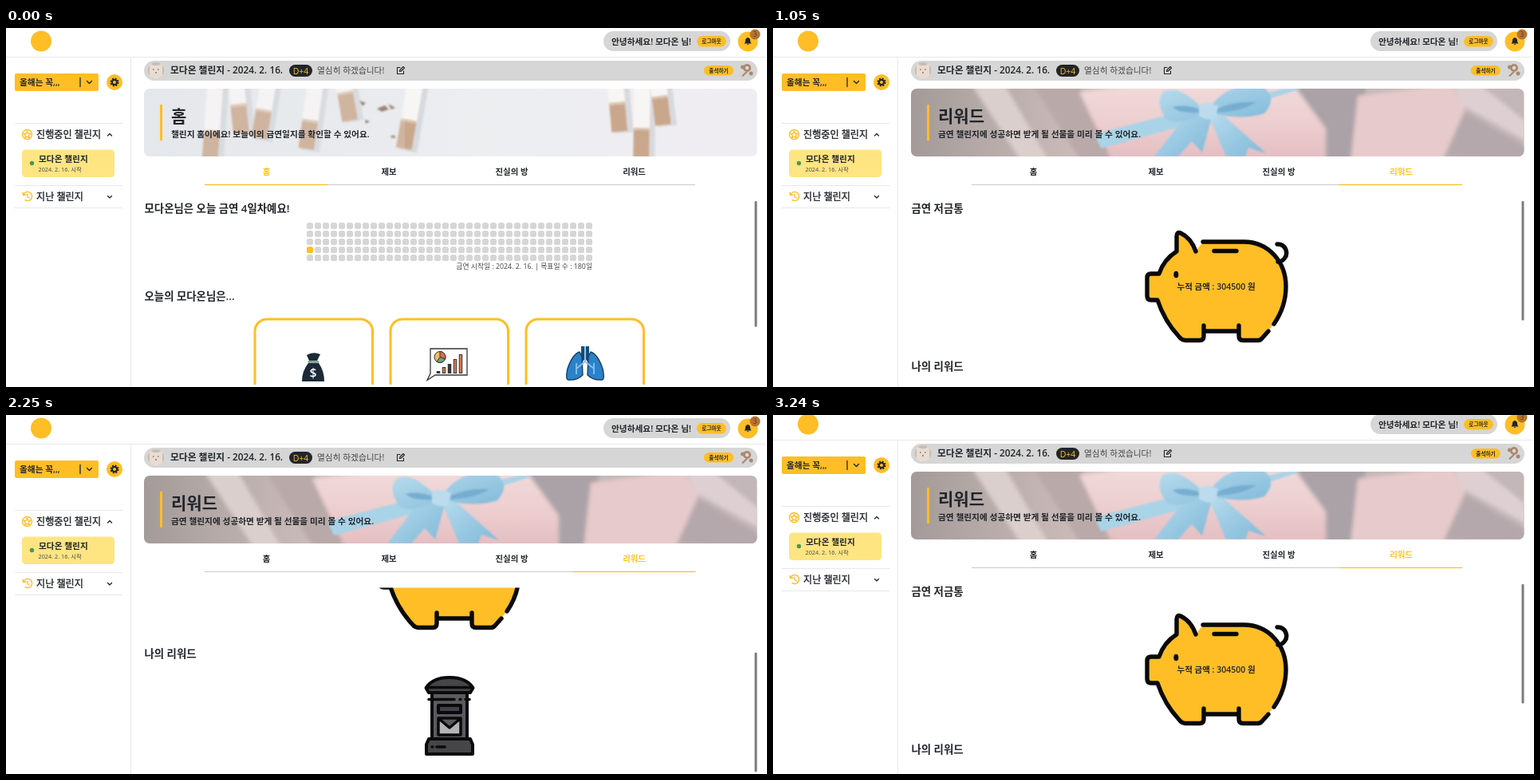
Write an HTML page that moves like this. It is 954 px wide and 450 px high and loops after 4.17 s.

```html
<!DOCTYPE html>
<html lang="ko">
<head>
<meta charset="utf-8">
<title>금연 챌린지</title>
<style>
  html, body { margin: 0; width: 100%; height: 100%; overflow: hidden; background: #fff; }
  svg { display: block; width: 100vw; height: 100vh; }
  text { font: 600 10.7px "Open Sans", "Noto Sans CJK KR", sans-serif; fill: #212529; }
  .light { font-weight: 400; fill: #444; }
  .menu { font-size: 12.1px; font-weight: 400; stroke: #212529; stroke-width: .35px; }
  .tiny { font-size: 6.6px; text-anchor: middle; }
  .title { font-size: 21px; }
  .section { font-size: 13.4px; }
  .tab { font-size: 10.4px; text-anchor: middle; }
  .tab.on { fill: #ffc21f; }
  .y { fill: #ffbe26; }
  .g { fill: #d6d6d6; }
  .line { fill: none; stroke: #212529; stroke-width: 1.3; stroke-linecap: round; stroke-linejoin: round; }
  .rule { stroke: #e8e8e8; }
  .pig { fill: none; stroke: #0a0a0a; stroke-width: 5.4; stroke-linecap: round; stroke-linejoin: round; }
  .box { stroke: #0a0a0a; stroke-width: 4; stroke-linejoin: round; }
</style>
</head>
<body>
<svg viewBox="0 0 954 450" preserveAspectRatio="none">
  <defs>
    <clipPath id="view"><rect x="170" y="216.5" width="767" height="230.5"/></clipPath>
    <clipPath id="bannerClip"><rect x="173" y="76" width="768.5" height="85" rx="7"/></clipPath>
    <clipPath id="avatarClip"><circle cx="188" cy="53" r="10.3"/></clipPath>
    <filter id="soft" x="-5%" y="-30%" width="110%" height="160%"><feGaussianBlur stdDeviation="2.5"/></filter>
    <filter id="slight" x="-5%" y="-30%" width="110%" height="160%"><feGaussianBlur stdDeviation=".9"/></filter>
    <linearGradient id="ash"><stop stop-color="#e3e7ea"/><stop offset=".55" stop-color="#eceef0"/><stop offset="1" stop-color="#f0edf2"/></linearGradient>
    <linearGradient id="taupe"><stop stop-color="#a39b99"/><stop offset=".12" stop-color="#b5aaa8"/><stop offset=".28" stop-color="#cbbcba"/><stop offset="1" stop-color="#c3b6b9"/></linearGradient>
    <linearGradient id="blush" x2="0" y2="1"><stop stop-color="#f1dbdb"/><stop offset=".5" stop-color="#edcfd0"/><stop offset="1" stop-color="#e3bcc0"/></linearGradient>
    <linearGradient id="sky" x2="1" y2="1"><stop stop-color="#b9dced"/><stop offset="1" stop-color="#7fb9d9"/></linearGradient>
    <g id="cigarette">
      <rect x="-6" y="-46" width="23" height="96" fill="#c9ccd0" opacity=".6"/>
      <rect x="-10" y="-48" width="20" height="96" fill="#f8f6f4"/>
      <rect x="-10" y="14" width="20" height="34" fill="#c9a78d"/>
      <rect x="-10" y="11" width="20" height="3" fill="#dcc5b0"/>
    </g>
  </defs>

  <g id="page">
    <!-- header -->
    <path class="rule" d="M0 36.5H952M156.5 37V455"/>
    <circle class="y" cx="44" cy="16.5" r="13"/>
    <rect class="g" x="749" y="4" width="159" height="25" rx="12.5"/>
    <text x="759" y="20.5">안녕하세요! 모다온 님!</text>
    <rect class="y" x="866" y="10" width="37" height="13.5" rx="6.7"/>
    <text class="tiny" x="884.5" y="19.3">로그아웃</text>
    <circle class="y" cx="930" cy="17" r="12.5"/>
    <path d="M925.5 19.5Q927 18 927 15.5Q927 12.5 930 12Q933 12.5 933 15.5Q933 18 934.5 19.5ZM928.5 20.2H931.5Q930 22.5 928.5 20.2" fill="#212529"/>
    <circle cx="939" cy="8" r="6.5" fill="#bb722b"/>
    <text class="light" x="939" y="11" style="font-size:8.5px;text-anchor:middle">3</text>

    <!-- sidebar -->
    <rect class="y" x="11" y="57" width="105" height="22" rx="2"/>
    <text x="17" y="72">올해는 꼭,,,</text>
    <path class="line" d="M93 62.5V73.5M101.5 66.5L104.5 69.5L107.5 66.5"/>
    <circle class="y" cx="136" cy="68" r="10"/>
    <circle cx="136" cy="68" r="4.5" fill="none" stroke="#212529" stroke-width="2" stroke-dasharray="2 1.534"/>
    <circle cx="136" cy="68" r="3" fill="none" stroke="#212529" stroke-width="2"/>
    <path class="rule" d="M11 119.5H146M11 197.5H146M11 225.5H146"/>
    <g fill="none" stroke="#ffbe26" stroke-width="1.4" stroke-linejoin="round" stroke-linecap="round">
      <circle cx="26.5" cy="133.5" r="6"/>
      <path d="M26.5 129.3L27.8 132.2L30.8 132.5L28.6 134.6L29.2 137.6L26.5 136.1L23.8 137.6L24.4 134.6L22.2 132.5L25.2 132.2Z"/>
      <path d="M22 208.5A5.6 5.6 0 1 1 24 215.7M21 206.5L21.8 209.5L25 209M27 208.3V211.5L29.3 213"/>
    </g>
    <text class="menu" x="38" y="138">진행중인 챌린지</text>
    <path class="line" d="M127.5 135L130 132.5L132.5 135M127.5 210.5L130 213L132.5 210.5"/>
    <rect x="20" y="152.5" width="116" height="34.5" rx="4.5" fill="#ffe582"/>
    <circle cx="32.5" cy="169.5" r="2.7" fill="#429c50"/>
    <text x="41" y="168">모다온 챌린지</text>
    <text class="light" x="40.5" y="180" style="font-size:7.3px">2024. 2. 16. 시작</text>
    <text class="menu" x="38" y="215.5">지난 챌린지</text>

    <!-- challenge bar -->
    <rect class="g" x="173" y="41" width="769" height="25" rx="12.5"/>
    <g clip-path="url(#avatarClip)">
      <path d="M177 42H199V64H177Z" fill="#c9bdb4"/>
      <path d="M180 64V44L185 47H191L196 44V64Z" fill="#e9ddd2"/>
      <path d="M184 52h1.500M190 52h1.500M187 56h2" stroke="#8a7168" stroke-width="1.5"/>
    </g>
    <text x="206" y="57" style="font-size:11.8px">모다온 챌린지 - 2024. 2. 16.</text>
    <rect x="355" y="46" width="29" height="15" rx="7.5" fill="#212529"/>
    <text class="light" x="369.5" y="57.5" style="font-size:10.5px;text-anchor:middle;fill:#ffbe26">D+4</text>
    <text class="light" x="390" y="57">열심히 하겠습니다!</text>
    <path class="line" style="stroke-width:1.1" d="M494 49.5H490.5V57.5H498.5V54M493.5 54.5L494 52.5L498 48.5L499.5 50L495.5 54Z"/>
    <rect class="y" x="875" y="47" width="37" height="12.5" rx="6.2"/>
    <text class="tiny" x="893.5" y="55.8">출석하기</text>
    <g fill="#a98873">
      <circle cx="929" cy="50" r="5"/><circle cx="923.5" cy="49" r="2.5"/><circle cx="934" cy="57" r="2.5"/>
      <path d="M928 54L922 60L924 61L930 55Z"/>
      <circle cx="929" cy="50" r="2.2" fill="#ecd8c9"/>
    </g>

    <!-- banner -->
    <g clip-path="url(#bannerClip)">
      <g id="homeBanner">
        <path d="M173 76H942V161H173Z" fill="url(#ash)"/>
        <g filter="url(#slight)">
          <use href="#cigarette" transform="translate(259 117) rotate(4)"/>
          <use href="#cigarette" transform="translate(290 84) rotate(-6)"/>
          <use href="#cigarette" transform="translate(325 91) rotate(9)"/>
          <use href="#cigarette" transform="translate(383 104) rotate(8)"/>
          <use href="#cigarette" transform="translate(423 69) rotate(-10)"/>
          <use href="#cigarette" transform="translate(507 104) rotate(10)"/>
          <use href="#cigarette" transform="translate(765 82) rotate(-5)"/>
          <use href="#cigarette" transform="translate(797 114) rotate(1)"/>
          <use href="#cigarette" transform="translate(818 74) rotate(-7)"/>
          <path d="M443 91l8 3-4 4zM465 101l10-4 5 5-9 3zM479 95l9 5-5 2zM450 115l6 2-5 3zM481 137l5-3 3 4z" fill="#8a6b59"/>
        </g>
        <path d="M173 76H500V161H173Z" fill="#e8ebee" opacity=".2"/>
      </g>
      <g id="rewardBanner">
        <path d="M173 76H942V161H173Z" fill="url(#taupe)"/>
        <g filter="url(#soft)">
          <path d="M248 70H290L345 165H310Z" fill="#dacfcc"/>
          <path d="M325 70H386L424 165H385Z" fill="#b9a9a9"/>
          <path d="M384 80L490 66H648L692 126V168H426Z" fill="url(#blush)"/>
          <path d="M650 66H745L726 168H694V126Z" fill="#aaa2a7"/>
          <path d="M733 85L850 70L868 100L838 168H724Z" fill="#e7cacb"/>
          <path d="M852 70H885L945 118V142L866 98Z" fill="#ded0d2"/>
          <path d="M842 161L868 105L945 150V168Z" fill="#b5a8ac"/>
        </g>
        <g filter="url(#slight)">
          <path d="M403 133L500 108L535 101L642 76H662L535 117L411 151Z" fill="#a9d3e6"/>
          <path d="M533 100L515 113L478 161H508L525 142L538 156L550 112Z" fill="url(#sky)"/>
          <path d="M544 105L568 161H592L596 150L618 157L562 107Z" fill="url(#sky)"/>
          <path d="M538 100Q508 70 489 80Q478 96 495 116Q510 122 540 107ZM549 98Q570 68 613 73Q634 87 616 107Q588 116 553 107Z" fill="url(#sky)"/>
          <path d="M536 102Q514 95 501 99Q510 108 537 106ZM555 102Q580 91 606 93Q588 105 555 106Z" fill="#76add0"/>
          <path d="M534 96Q545 91 558 98L555 113Q544 117 534 110Z" fill="#bcdced"/>
        </g>
      </g>
    </g>
    <path class="y" d="M193 96H196V141H193Z"/>
    <text class="title" id="heading" x="207" y="118"></text>
    <text id="subtitle" x="207" y="136.8"></text>

    <!-- tabs -->
    <path d="M249 196.5H864" stroke="#c9c9c9"/>
    <rect class="y" id="underline" y="195.8" width="154" height="1.3"/>
    <text class="tab" x="326.5" y="184.3">홈</text>
    <text class="tab" x="480" y="184.3">제보</text>
    <text class="tab" x="634" y="184.3">진실의 방</text>
    <text class="tab" x="787.5" y="184.3">리워드</text>

    <g clip-path="url(#view)">
      <g id="home">
        <text class="section" x="173.5" y="231">모다온님은 오늘 금연 4일차예요!</text>
        <g id="days"></g>
        <text class="light" x="735" y="301.5" style="font-size:8.8px;text-anchor:end">금연 시작일 : 2024. 2. 16. | 목표일 수 : 180일</text>
        <text class="section" x="173.5" y="341">오늘의 모다온님은...</text>
        <g fill="#fff" stroke="#ffbe26" stroke-width="3">
          <rect x="312" y="365" width="147.5" height="170" rx="15"/>
          <rect x="482" y="365" width="147.5" height="170" rx="15"/>
          <rect x="652" y="365" width="147.5" height="170" rx="15"/>
        </g>
        <rect id="note" x="388.5" width="6" height="4" fill="#e9b29c"/>
        <g class="icon" data-x="385" data-y="444">
          <path d="M377 410Q385 405 394 409L390 417H380ZM379 420H392Q399 430 399 443H371Q371 430 379 420Z" fill="#1c2936"/>
          <path d="M378.5 418.5H392" stroke="#4f8f77" stroke-width="2"/>
          <text x="385" y="438.5" style="font-size:16px;fill:#fff;text-anchor:middle">$</text>
        </g>
        <g class="icon" data-x="578" data-y="421">
          <path d="M534 402H578V435H538L528 441.5L532 433V402Z" fill="#fff" stroke="#33363b" stroke-width="1.3"/>
          <circle cx="544" cy="412.5" r="7" fill="#f0bd62" stroke="#33363b"/>
          <path d="M544 412.5V405.5A7 7 0 0 1 550.5 415Z" fill="#d96d50" stroke="#33363b"/>
          <path d="M544 412.5L550.5 415A7 7 0 0 1 540 418.3Z" fill="#78a078" stroke="#33363b"/>
          <path d="M542 433V430M549 433V425M556 433V421M563 433V415M570 433V409" stroke="#33363b" stroke-width="4.5"/>
          <path d="M549 432V426M563 432V416M570 432V410" stroke="#d9784b" stroke-width="2.5"/>
        </g>
        <g class="icon" data-x="726" data-y="421">
          <path d="M723 399V415L717 422M729 399V415L735 422" fill="none" stroke="#164b7d" stroke-width="4"/>
          <path d="M719 406Q710 409 704 427Q701 441 705 441Q716 442 723 435L722 412ZM733 406Q742 409 748 427Q751 441 747 441Q736 442 729 435L730 412Z" fill="#2b82c9" stroke="#183f65" stroke-width="1.4"/>
          <path d="M726 399V418L715 427M726 418L737 427M715 420V434M737 420V434" fill="none" stroke="#83c1ed" stroke-width="1.8"/>
        </g>
      </g>

      <g id="reward">
        <text class="section" x="173.5" y="231">금연 저금통</text>
        <path class="y" d="M484 308Q490 290 506 280V261Q506 255 511 257Q524 263 530 280L539 268H590C622 268 643 294 643 324C643 343 637 358 628 371L613 389Q611 391.500 608 391.500H589Q584 391.500 584 386V380H540V386Q540 391.500 535 391.500H517Q513 391.500 510 388Q491 368 482 341H474Q469 341 469 336V313Q469 308 474 308Z"/>
        <path class="pig" d="M530 280Q524 263 511 257Q506 255 506 261V280Q490 290 484 308H474Q469 308 469 313V336Q469 341 474 341H482Q491 368 510 388Q513 391.500 517 391.500H535Q540 391.500 540 386V373M540 380H584M584 373V386Q584 391.500 589 391.500H608Q611 391.500 613 389L621 380M628 371C637 358 643 343 643 324C643 294 622 268 590 268H539M553 279.5H581M632 271C642 270 647 282 641 289Q638 293 633 293"/>
        <ellipse cx="505.3" cy="309" rx="3" ry="4.3" fill="#0a0a0a"/>
        <text x="506.5" y="328" style="font-size:10.5px">누적 금액 : 304500 원</text>
        <text class="section" x="173.5" y="428.5">나의 리워드</text>
        <g transform="translate(0 125)">
          <path class="box" fill="#5b5b5f" d="M534 348H578V408H534Z"/>
          <path class="box" fill="#464649" d="M526.5 342Q535 329 556 329Q577 329 585.5 342L582 348H530Z"/>
          <path class="box" fill="#464649" d="M530 406H582L585 413V425H527V413Z"/>
          <path class="pig" style="stroke-width:3.5" d="M528 341.5H584M530 356.5H562M569 356.5H570M576 356.5H581M534 416H535M540 416H550"/>
          <path class="box" fill="#41414e" d="M542 364H570V373H542Z"/>
          <path class="box" style="stroke-width:3.5" fill="#b4b4b6" d="M542 380H570V401H542ZM543 381L556 392L569 381"/>
        </g>
      </g>
    </g>
    <rect id="thumb" x="938.5" width="3" rx="1" fill="#7c7c7c"/>
    <g id="toast">
      <rect class="g" x="456" y="361" width="200" height="32" rx="4.5"/>
      <text x="556" y="380.5" style="font-size:9.3px;text-anchor:middle">리워드는 챌린지가 끝난 후 확인할 수 있습니다!</text>
    </g>
  </g>
</svg>
<script>
const LOOP = 4170, SWITCH = 780;
const $ = id => document.getElementById(id);
const tabs = document.querySelectorAll('.tab');
const icons = document.querySelectorAll('.icon');

// 180 days, filled column by column; the fourth is today
$('days').innerHTML = Array.from({ length: 180 }, (_, i) =>
  `<rect class="${i === 3 ? 'y' : 'g'}" x="${377 + 10 * Math.floor(i / 5)}" y="${244 + 10 * (i % 5)}" width="8" height="8" rx="2.6"/>`
).join('');

// Eased progress from 0 to 1 between two times
function ramp(t, from, to) {
  const p = Math.min(1, Math.max(0, (t - from) / (to - from)));
  return p < .5 ? 4 * p ** 3 : 1 - (2 - 2 * p) ** 3 / 2;
}
const show = (id, on) => { $(id).style.display = on ? '' : 'none'; };

function draw(t) {
  const home = t < SWITCH;
  show('home', home);
  show('homeBanner', home);
  show('reward', !home);
  show('rewardBanner', !home);
  $('heading').textContent = home ? '홈' : '리워드';
  $('subtitle').textContent = home
    ? '챌린지 홈이에요! 보늘이의 금연일지를 확인할 수 있어요.'
    : '금연 챌린지에 성공하면 받게 될 선물을 미리 볼 수 있어요.';
  tabs.forEach((tab, i) => tab.classList.toggle('on', i === (home ? 0 : 3)));
  $('underline').setAttribute('x', 249 + 461 * ramp(t, SWITCH, 1050));

  const scale = 1 - .025 * (1 - Math.cos(2 * Math.PI * t / 1140));
  for (const icon of icons) {
    const { x, y } = icon.dataset;
    icon.setAttribute('transform', `translate(${x} ${y}) scale(${scale}) translate(${-x} ${-y})`);
  }
  show('note', t > 450 && t < 700);
  $('note').setAttribute('y', 394 + (t - 570) * .05);

  const scroll = 50 * ramp(t, 1830, 1945) + 75 * ramp(t, 2070, 2220) - 125 * ramp(t, 2940, 3240);
  $('reward').setAttribute('transform', `translate(0 ${-scroll})`);
  $('thumb').setAttribute('y', 217 + scroll * .645);
  $('thumb').setAttribute('height', home ? 157.5 : 149.5);
  $('toast').setAttribute('opacity', ramp(t, 2430, 2540) - ramp(t, 2700, 2880));
  $('page').setAttribute('transform', `translate(0 ${-5 * ramp(t, 2290, 2400)})`);
}

function frame() {
  draw(performance.now() % LOOP);
  requestAnimationFrame(frame);
}
frame();
</script>
</body>
</html>
```
